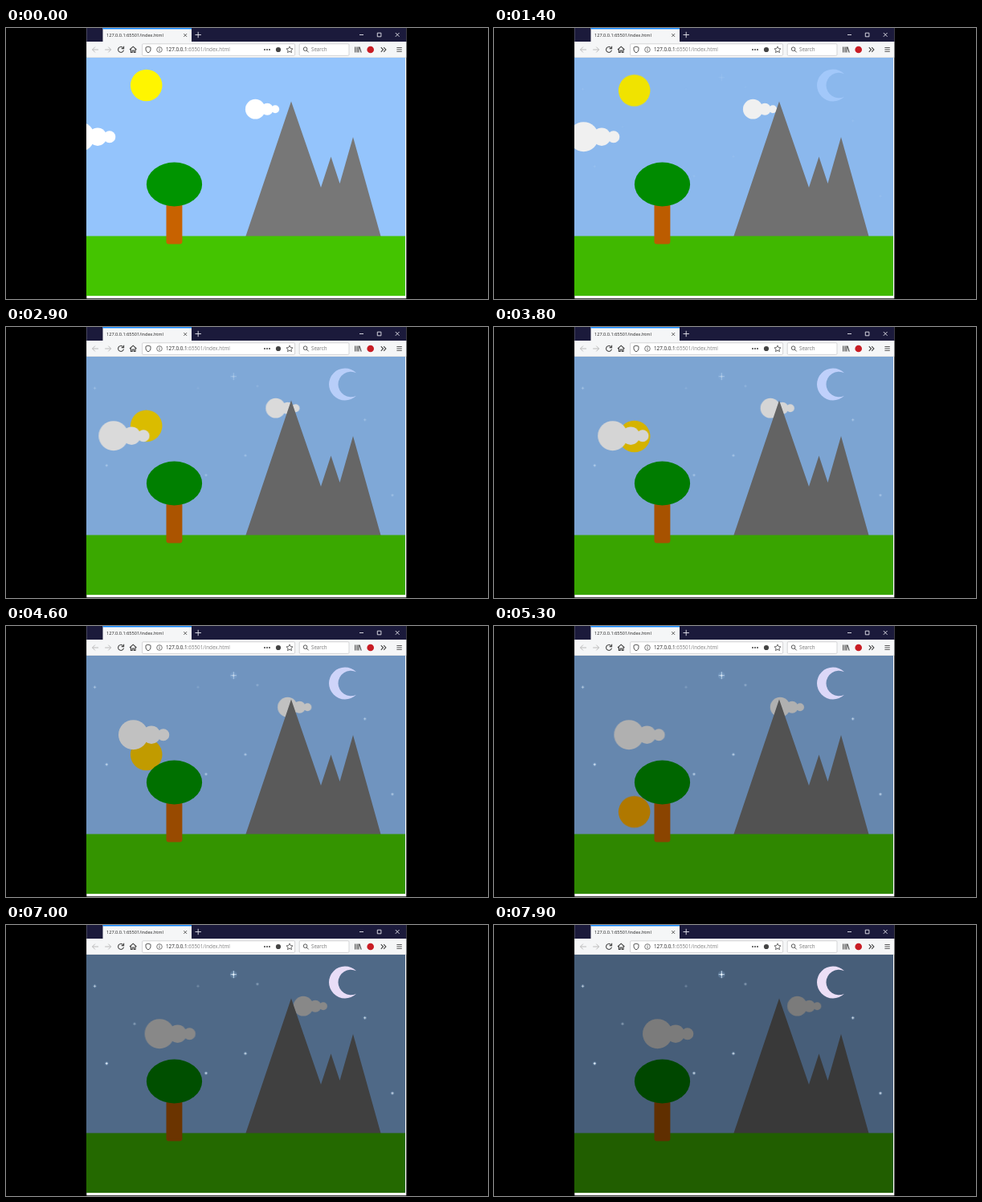
An HTML page that plays this animation: 600x338 px, repeating every 8 s.

```html
<!DOCTYPE html>
<html lang="en">
<head>
<meta charset="utf-8">
<title>Day to night</title>
<style>
  html, body { margin: 0; width: 100%; height: 100%; overflow: hidden; background: #000; }
  svg { display: block; width: 600px; height: 338px; }
  text { font-family: "Open Sans", "Noto Sans", sans-serif; fill: #222; }
  .line { fill: none; stroke: #444; }
  .pale { stroke: #bbb; }
  .light { stroke: #e8e8f0; }

  .dim, .cloud, .sun, .moon, .stars { animation: 8s linear infinite; }
  .dim { animation-name: dim; }
  .cloud { animation-name: drift; fill: #fff; }
  .sun { animation-name: set; animation-timing-function: ease-in-out; }
  .moon { animation-name: moon; }
  .stars { animation-name: stars; }

  @keyframes dim {
    0% { filter: brightness(1); }
    17.5% { filter: brightness(.94); }
    36.25% { filter: brightness(.855); }
    47.5% { filter: brightness(.835); }
    66.25% { filter: brightness(.69); }
    87.5% { filter: brightness(.535); }
    100% { filter: brightness(.475); }
  }
  /* --k scales the drift of each cloud */
  @keyframes drift {
    0% { transform: translateX(0); }
    17.5% { transform: translateX(calc(var(--k) * 20px)); }
    36.25% { transform: translateX(calc(var(--k) * 42.3px)); }
    47.5% { transform: translateX(calc(var(--k) * 56.2px)); }
    66.25% { transform: translateX(calc(var(--k) * 76.4px)); }
    87.5% { transform: translateX(calc(var(--k) * 99.6px)); }
    100% { transform: translateX(calc(var(--k) * 113.4px)); }
  }
  @keyframes set {
    0%, 8.75% { transform: translateY(0); fill: #fff500; }
    48.75% { transform: translateY(65px); fill: #ffd600; }
    88.75%, 100% { transform: translateY(307px); fill: #ff7000; }
  }
  @keyframes moon {
    0% { fill: #a4caff; opacity: 0; }
    17.5% { fill: #a2c8fa; opacity: 1; }
    36.25% { fill: #b8cef9; }
    47.5% { fill: #bfd0fb; }
    66.25% { fill: #dcd8f8; }
    87.5% { fill: #e8ddf7; }
    100% { fill: #ecdff6; opacity: 1; }
  }
  @keyframes stars {
    0% { opacity: 0; }
    17.5% { opacity: .12; }
    36.25% { opacity: .38; }
    47.5% { opacity: .48; }
    66.25% { opacity: .8; }
    87.5% { opacity: .95; }
    100% { opacity: 1; }
  }
</style>
</head>
<body>
<svg viewBox="0 0 600 338">
  <defs>
    <clipPath id="view"><rect x="100.5" y="37" width="395.7" height="296.5"/></clipPath>
    <g id="star">
      <circle r="2.4" fill="#a8d4ff" opacity=".22"/>
      <path d="M-1.6 0H1.6M0-1.6V1.6" stroke="#e4f2ff" stroke-width=".8"/>
      <circle r=".8" fill="#f0f8ff"/>
    </g>
  </defs>

  <!-- browser window -->
  <rect x="100.3" width="398" height="337.3" fill="#fff"/>
  <rect x="100.3" width="398" height="17" fill="#1b1a3b"/>
  <rect x="120.5" y="0" width="110.5" height="17" fill="#f5f6f7"/>
  <rect x="120.5" y="0" width="110.5" height="1.4" fill="#0a84ff"/>
  <text x="125" y="11" font-size="5.6">127.0.0.1:65501/index.html</text>
  <path class="line" d="M221.2 7l4 4m0-4l-4 4" stroke-width=".8"/>
  <path class="line light" d="M235.5 8.5h7.4M239.2 4.8v7.4M440 8.5h5M462.3 6.2h4.6v4.6h-4.6zM484.8 6l4.8 4.8m0-4.8l-4.8 4.8" stroke-width=".9"/>
  <rect x="100.3" y="17" width="398" height="19.6" fill="#f5f6f7"/>
  <path d="M100.3 36.8h398" stroke="#ccc" stroke-width=".6"/>

  <g class="line">
    <path class="pale" d="M115 27h-7.5m3.4-3.4l-3.4 3.4 3.4 3.4M123.2 27h7.5m-3.4-3.4l3.4 3.4-3.4 3.4"/>
    <path d="M145.7 24.6a3.5 3.5 0 1 0 .8 3.1M146.6 22.8v2.8h-2.9" stroke-width="1.1"/>
    <path d="M154 27l4.2-3.8 4.2 3.8M155.4 26.4v4h1.8v-2.4h2v2.4h1.8v-4" stroke-width="1.1"/>
    <g stroke="#c4c4c8" stroke-width=".7" fill="#fff">
      <rect x="169.6" y="19.8" width="190" height="14.6" rx="1.2"/>
      <rect x="365.2" y="19.8" width="61.8" height="14.6" rx="1.2"/>
    </g>
    <path d="M177 23.2l3 1v2.8q0 2.6-3 3.9-3-1.3-3-3.9v-2.8z" stroke-width=".9"/>
    <circle cx="191" cy="27" r="3.3" stroke-width=".7"/>
    <path d="M191 26.4v2.4m0-4v.8" stroke-width=".8"/>
    <path d="M353 23l1.2 2.6 2.8.3-2.1 1.9.6 2.8-2.5-1.4-2.5 1.4.6-2.8-2.1-1.9 2.8-.3z" stroke-width=".8"/>
    <circle cx="372.6" cy="26.2" r="2.3" stroke-width=".9"/>
    <path d="M374.3 28l2.4 2.4" stroke-width=".9"/>
    <path d="M434.7 23.4v7.2m2.3-7.2v7.2m2-7.2v7.2m1-7l2.2 7" stroke-width="1.1"/>
    <path d="M466.8 24.2l2.7 2.8-2.7 2.8m3.4-5.6l2.7 2.8-2.7 2.8" stroke-width="1.1"/>
    <path d="M486.4 24.5h6.4m-6.4 2.4h6.4m-6.4 2.4h6.4" stroke-width=".9"/>
  </g>
  <g fill="#444">
    <circle cx="322" cy="27" r="1"/><circle cx="325" cy="27" r="1"/><circle cx="328" cy="27" r="1"/>
    <circle cx="339" cy="27" r="3.1"/>
  </g>
  <circle cx="453.7" cy="27" r="4.3" fill="#c81c24"/>
  <text x="199" y="29.2" font-size="6.3">127.0.0.1<tspan fill="#808080">:65501/index.html</tspan></text>
  <text x="380" y="29.2" font-size="6.2" style="fill:#777">Search</text>

  <!-- landscape -->
  <g clip-path="url(#view)">
    <rect class="dim" x="100" y="37" width="397" height="223" fill="#94c4fc"/>

    <g class="stars">
      <circle cx="283.3" cy="61.7" r="4.5" fill="#a8d4ff" opacity=".18"/>
      <path d="M279.7 61.7h7.2M283.3 57.2v9" stroke="#d8eeff" stroke-width=".9"/>
      <circle cx="283.3" cy="61.7" r="1.2" fill="#f0f8ff"/>
      <use href="#star" x="110.5" y="76.3" opacity=".7"/>
      <use href="#star" x="125.3" y="172.7"/>
      <use href="#star" x="249" y="184.8" opacity=".8"/>
      <use href="#star" x="298" y="160.3" opacity=".8"/>
      <use href="#star" x="446.7" y="115.8" opacity=".8"/>
      <use href="#star" x="481" y="209.8" opacity=".8"/>
      <use href="#star" x="313" y="73.7" opacity=".4"/>
      <use href="#star" x="239" y="76.3" opacity=".25"/>
      <use href="#star" x="160" y="123.3" opacity=".4"/>
    </g>
    <path class="moon" d="M436 57.2A20 20 0 1 0 436 85.8A15.8 15.8 0 1 1 436 57.2z"/>

    <g class="dim">
      <circle class="sun" cx="174.7" cy="71.5" r="19.8"/>
      <g class="cloud" style="--k:1">
        <circle cx="91.5" cy="135.7" r="18.5"/>
        <circle cx="114" cy="135.7" r="11.2"/>
        <circle cx="128.8" cy="135.7" r="7.5"/>
      </g>
      <g class="cloud" style="--k:.6">
        <circle cx="310.3" cy="101.2" r="12.4"/>
        <circle cx="325.2" cy="101.2" r="7.5"/>
        <circle cx="335.1" cy="101.2" r="5"/>
      </g>
      <path d="M298.3 260L355 91.5 392 199l12.5-38.5L415.5 194 432 136l34.6 124z" fill="#777"/>
      <rect x="100" y="259.5" width="397" height="75" fill="#44c400"/>
      <rect x="199.5" y="212" width="19.9" height="57.5" rx="3" fill="#c86200"/>
      <ellipse cx="209.5" cy="195" rx="34.6" ry="27.4" fill="#009400"/>
    </g>
  </g>
</svg>
</body>
</html>
```
